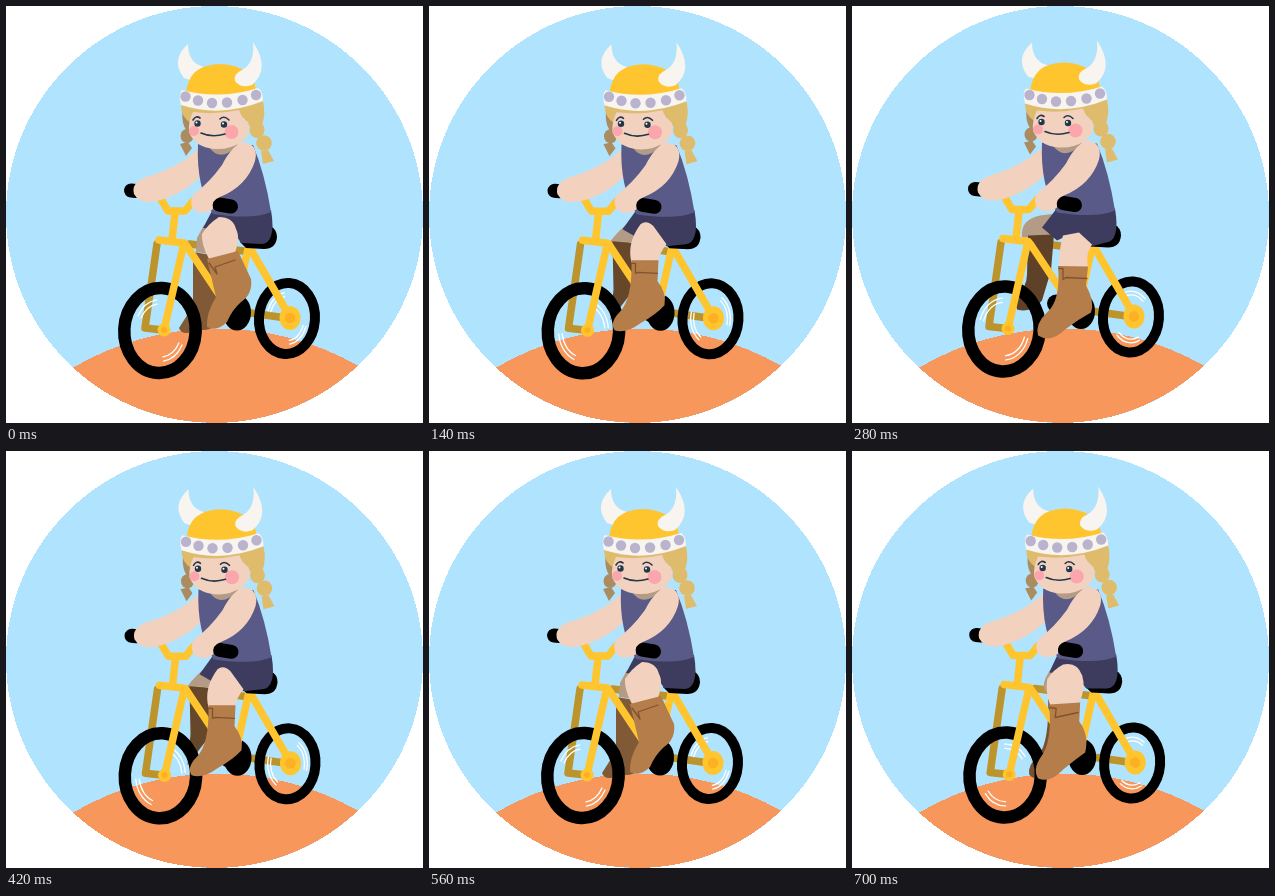
An HTML page that plays this animation: 417 px wide and 417 px high, repeating every 0.84 s.

```html
<!DOCTYPE html>
<html lang="en">
<head>
<meta charset="utf-8">
<title>Viking cyclist</title>
<style>
  html, body { margin: 0; width: 100%; height: 100%; overflow: hidden; background: #fff; }
  svg { display: block; width: 100vw; height: 100vh; }
  .skin { fill: #f2d2bf; }
  .shade { fill: #b49b86; }
  .hair { fill: #dfbc6c; }
  .back-hair { fill: #aa8c60; }
  .yellow { fill: #ffc52f; }
  .horn { fill: #f8f4f0; }
  .ink { fill: #24364a; }
  .cheek { fill: #fba6ad; }
  .line { fill: none; stroke-linejoin: round; stroke-linecap: round; }
  .tube { stroke: #ffc52f; stroke-width: 7.5; }
  .back { stroke: #bd942b; stroke-width: 7.5; }
  .grip { stroke: #000; stroke-width: 14; }
  .face-line { stroke: #24364a; stroke-width: 1.6; }
  .tyre { fill: none; stroke: #000; }
  .shine { stroke: #fff; stroke-width: 1.3; }
</style>
</head>
<body>
<svg viewBox="0 0 417 417">
  <g shape-rendering="crispEdges">
    <circle cx="208.5" cy="208.5" r="208.5" fill="#b0e4fe"/>
    <path fill="#f7975b" d="M67 361.600A286 286 0 0 1 352 359.600A208.500 208.500 0 0 1 67 361.600Z"/>
  </g>

  <g id="rider">
    <!-- far side of the bike and far leg -->
    <path class="line back" d="M151 238L139 322L157 324M184 238L245 246M238 306L280 312"/>
    <path id="farThigh" class="shade"/>
    <path id="farBoot"/>
    <circle id="farPedal" r="9"/>

    <!-- wheels and frame -->
    <ellipse class="tyre" cx="281" cy="312.500" rx="28" ry="35.500" stroke-width="10" transform="rotate(4 281 312)"/>
    <ellipse class="tyre" cx="154" cy="324.500" rx="35.700" ry="42.500" stroke-width="12.500" transform="rotate(3 154 324)"/>
    <path id="shine" class="line shine"/>
    <ellipse cx="231" cy="306.500" rx="14" ry="18"/>
    <path class="line tube" d="M180 239L214 290M242 243L231 292M245 244L284 311"/>
    <path d="M234 236L264 220Q271 223 271 231Q270 243 258 243L240 242Z"/>
    <ellipse class="yellow" cx="284" cy="312" rx="10.500" ry="12"/>
    <circle cx="284" cy="312" r="5.300" fill="#fdb022"/>

    <!-- near leg -->
    <path id="shorts" fill="#3d3c5f"/>
    <path id="nearLeg" class="skin"/>
    <path id="nearBoot" fill="#b47d49"/>
    <path id="cuff" class="line" stroke="#805330" stroke-width="1.300"/>

    <!-- fork and handlebar -->
    <path class="line tube" d="M153 234L178 237L158 324M169 207L166 234"/>
    <path class="line tube" d="M153 190L162 205L179 205L187 195"/>
    <circle class="yellow" cx="158" cy="324" r="6.500"/>
    <circle cx="158" cy="324" r="3" fill="#fdb022"/>
    <path class="line grip" d="M125 184.500L130 185"/>

    <!-- torso and arms -->
    <path class="skin" d="M192 143Q174 161 139 171.500Q125 177 128 188Q134 199 151 195Q178 188 196 169Z"/>
    <path class="skin" d="M198 130H235V150H200Z"/>
    <path class="shade" d="M202 137H232Q226 151 215 151Q205 150 202 137Z"/>
    <path fill="#595a87" d="M192 138L203 141Q214 157 231 140L247 139Q259 168 265 206Q247 214 207 208Q190 181 192 138Z"/>
    <path class="line grip" d="M213 198.500L225 200.500"/>
    <path class="skin" d="M238 136Q253 139 249 155Q241 180 214 191Q205 194 207 203Q198 210 188 204Q182 196 188 188Q203 177 216 159Q226 139 238 136Z"/>

    <!-- head -->
    <g class="back-hair">
      <path d="M177 102L189 115L184 128Q174 120 177 102Z"/>
      <ellipse cx="181" cy="130" rx="6.500" ry="7"/>
      <path d="M174 138L182 136L186 142L180 150Z"/>
    </g>
    <g class="hair">
      <path d="M175 99Q215 108 257 95Q260 108 256 119L245 122L238 112L185 117Q175 111 175 99Z"/>
      <ellipse cx="251" cy="124" rx="7.500" ry="8"/>
      <circle cx="258" cy="137" r="7.800"/>
      <path d="M255 145L262 144L268 155L257 158Z"/>
    </g>
    <path class="skin" d="M187 106Q211 109 233 104Q236 113 242 116Q246 128 235 136Q224 144 208 143Q189 141 183 126Q182 116 187 106Z"/>
    <circle class="cheek" cx="188" cy="125" r="5"/>
    <circle class="cheek" cx="225.500" cy="126" r="7"/>
    <circle class="ink" cx="191.500" cy="117.500" r="3.200"/>
    <circle class="ink" cx="218" cy="118.500" r="3.200"/>
    <circle cx="190.500" cy="116.500" r="1" fill="#fff"/>
    <circle cx="217" cy="117.500" r="1" fill="#fff"/>
    <path class="line face-line" d="M195 127Q206 132 219 128M187 114Q190 109 194 112M214 113Q218 109 223 114"/>

    <!-- helmet -->
    <path class="horn" d="M182 38Q164 54 178 72L187 75Q189 65 198 61Q182 57 182 38Z"/>
    <path class="yellow" d="M180 88Q182 58 215 58Q247 60 250 84Q215 96 180 88Z"/>
    <path class="horn" d="M247 36Q249 57 236 64Q227 68 229 75Q235 83 246 79Q265 63 247 36Z"/>
    <path class="horn" d="M176 84Q214 94 252 82Q257 85 257 95Q215 112 175 99Q172 88 176 84Z"/>
    <g id="studs" fill="#b9b3cd"></g>
  </g>
</svg>

<script>
const STEP = 140;
const SEQUENCE = ["high", "mid", "low", "mid", "high", "rise"];

// shine: angle in degrees and half-width of the glints on the front and rear wheels
const POSES = {
  high: {
    shift: [0, 0], far: "#805936", shine: [235, 27, 50, 32], pedal: [231, 312],
    farThigh: "M198 219L207 226L205 248L190 246L191 232Z",
    farBoot: "M187 246L212 250L213 318Q205 325 192 324Q176 331 173 322L187 300Z",
    shorts: "M206 205L265 204Q268 222 265 230Q263 237 256 238L235 237L228 226L197 222Z",
    nearLeg: "M213 211Q227 211 230 223Q235 232 228 249L203 253Q195 238 196 228Q202 218 213 211Z",
    nearBoot: "M201 253L232 245L245 273Q247 288 235 296Q226 304 221 316Q211 326 201 321Q200 307 210 291Z",
    cuff: "M203 257L211 268L209 261L229 254"
  },
  mid: {
    shift: [.5, .3], far: "#674729", shine: [143, 31, 340, 35], pedal: [222, 307],
    farThigh: "M202 214L210 225L205 236L181 235Q188 225 202 214Z",
    farBoot: "M183 235L207 237L203 285L190 302L181 314L184 283Z",
    shorts: "M206 205L265 204Q268 222 265 230Q263 237 256 238L237 240L222 229L207 231L193 223Z",
    nearLeg: "M211 218Q217 213 224 220L237 238Q231 245 228 256L202 256Q197 237 211 218Z",
    nearBoot: "M202 254L229 254L228 275Q237 286 235 299Q227 308 211 317Q196 328 185 324Q180 316 190 306Q203 293 202 254Z",
    cuff: "M202 257H206V267L209 266L228 267"
  },
  low: {
    shift: [-2, -1.5], far: "#5f4127", shine: [232, 34, 280, 35], pedal: [206, 299],
    farThigh: "M206 209L215 224L201 233L172 233Q170 215 190 211Z",
    farBoot: "M178 231L204 230L201 266L192 296Q182 309 167 305L164 294Q177 284 177 270Z",
    shorts: "M206 205L265 204Q268 222 265 230Q263 237 256 238L241 242L218 231L207 236L192 223Z",
    nearLeg: "M213 231L229 228L242 240Q235 250 238 263L209 264Q209 243 213 231Z",
    nearBoot: "M208 261.500L238 262L236 281Q245 297 241 308Q228 315 215 325Q201 339 188 331Q185 319 197 308Q211 296 208 261.500Z",
    cuff: "M209 264H213V275L216 273L237 274"
  },
  rise: {
    shift: [-.8, -.5], far: "#765130", shine: [116, 27, 275, 32], pedal: [229, 310],
    farThigh: "M205 213L209 226L203 248L193 240Q190 228 205 213Z",
    farBoot: "M197 248L212 250L211 308L195 321Q184 332 178 324Q176 315 188 304Q198 290 197 248Z",
    shorts: "M206 205L265 204Q268 222 265 230Q263 237 256 238L235 238L224 224L198 222Z",
    nearLeg: "M212 214Q226 211 231 225Q235 238 228 252L199 255Q194 241 196 229Q202 219 212 214Z",
    nearBoot: "M198 254L229 252L228 271Q238 284 234 302Q224 309 212 319Q199 333 187 328Q181 319 190 306Q201 292 198 254Z",
    cuff: "M199 257L205 258L204 267L227 262"
  }
};

const $ = id => document.getElementById(id);

function arc(cx, cy, rx, ry, angle, half) {
  const point = degrees => {
    const a = degrees * Math.PI / 180;
    return `${cx + rx * Math.cos(a)} ${cy + ry * Math.sin(a)}`;
  };
  return `M${point(angle - half)}A${rx} ${ry} 0 0 1 ${point(angle + half)}`;
}

function glints([front, half, rear, rearHalf]) {
  let d = "";
  for (const turn of [0, 180]) {
    for (const k of [.74, .86]) {
      d += arc(154, 324.5, 29 * k, 36 * k, front + turn, half);
      d += arc(281, 312.5, 23 * k, 30 * k, rear + turn, rearHalf);
    }
  }
  return d;
}

$("studs").innerHTML = [[179.5, 90.5], [192, 94.5], [206, 97], [221, 96.5], [236.5, 94], [250, 89]]
  .map(([x, y]) => `<circle cx="${x}" cy="${y}" r="5.2"/>`).join("");

function draw() {
  const index = Math.floor(performance.now() / STEP) % SEQUENCE.length;
  const pose = POSES[SEQUENCE[index]];
  $("rider").setAttribute("transform", `translate(${pose.shift})`);
  for (const id of ["farThigh", "farBoot", "shorts", "nearLeg", "nearBoot", "cuff"]) {
    $(id).setAttribute("d", pose[id]);
  }
  $("farBoot").setAttribute("fill", pose.far);
  $("farPedal").setAttribute("transform", `translate(${pose.pedal})`);
  $("shine").setAttribute("d", glints(pose.shine));
  requestAnimationFrame(draw);
}
draw();
</script>
</body>
</html>
```
